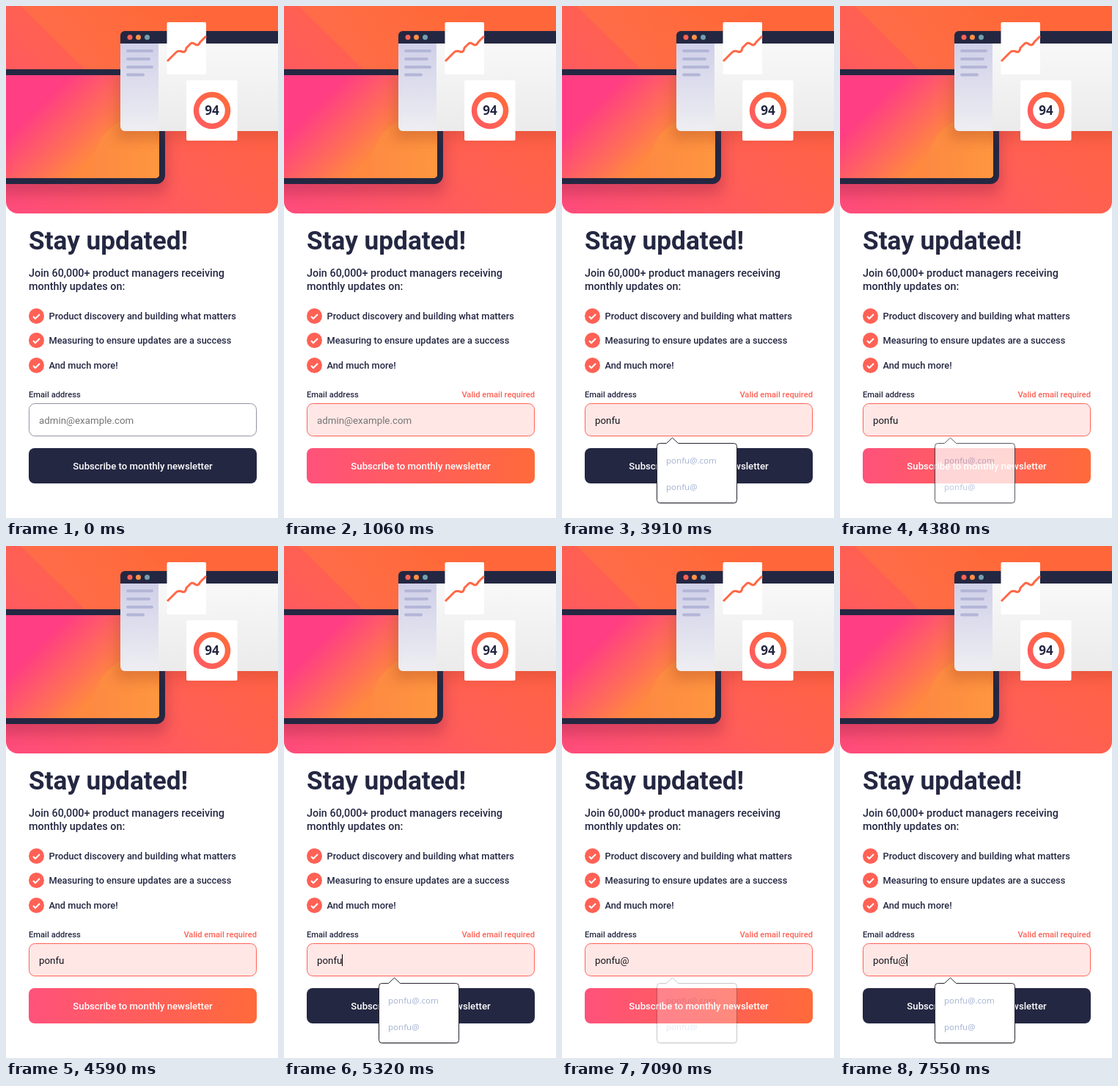
Write an HTML page that moves like this. It is 371 px wide and 696 px high and loops after 8 s.

```html
<!DOCTYPE html>
<html lang="en">
<head>
<meta charset="utf-8">
<title>Newsletter sign-up</title>
<style>
  html, body { margin: 0; width: 100%; height: 100%; overflow: hidden; background: #fff; }
  svg { display: block; font-family: Roboto, sans-serif; font-weight: 500; fill: #242742; }
  .title { font-size: 35.2px; font-weight: 700; }
  .lead { font-size: 14.4px; }
  .list { font-size: 12.8px; }
  .label { font-size: 11.2px; }
  .field { font-size: 13.333px; font-weight: 400; }
  .action { font-size: 13.2px; fill: #fff; text-anchor: middle; }
  .hint { font: 11.55px "Open Sans", sans-serif; fill: #a2b1d2; }
  .red { fill: #ff6155; }
</style>
</head>
<body>
<svg width="371" height="696" viewBox="0 0 371 696">
  <defs>
    <linearGradient id="hero" gradientUnits="userSpaceOnUse" x1="20" y1="290" x2="250" y2="30">
      <stop stop-color="#ff4c7c"/><stop offset=".55" stop-color="#ff5f55"/><stop offset="1" stop-color="#ff6340"/>
    </linearGradient>
    <linearGradient id="facet" gradientUnits="userSpaceOnUse" x1="60" y1="90" x2="190" y2="0">
      <stop stop-color="#ff7048" stop-opacity=".75"/><stop offset="1" stop-color="#ff6a3a"/>
    </linearGradient>
    <linearGradient id="screen" gradientUnits="userSpaceOnUse" x1="50" y1="130" x2="122" y2="202">
      <stop stop-color="#ff3e83"/><stop offset="1" stop-color="#ff893f"/>
    </linearGradient>
    <linearGradient id="sun" x1="0" y1="0" x2="1" y2="0">
      <stop stop-color="#fd8a42"/><stop offset="1" stop-color="#ff9d3d"/>
    </linearGradient>
    <linearGradient id="side" x1="0" y1="0" x2="0" y2="1">
      <stop stop-color="#cfd0e9"/><stop offset="1" stop-color="#eeeeF2"/>
    </linearGradient>
    <linearGradient id="pane" x1="0" y1="0" x2="0" y2="1">
      <stop stop-color="#f8f8f8"/><stop offset="1" stop-color="#ebebeb"/>
    </linearGradient>
    <linearGradient id="warm">
      <stop stop-color="#ff527b"/><stop offset="1" stop-color="#ff6a3a"/>
    </linearGradient>
    <linearGradient id="ring" x1="0" y1="1" x2="1" y2="0">
      <stop stop-color="#ff5a63"/><stop offset="1" stop-color="#ff6c38"/>
    </linearGradient>
    <filter id="soft" x="-20%" y="-20%" width="140%" height="140%"><feGaussianBlur stdDeviation="9"/></filter>
    <clipPath id="card"><rect y="-20" width="371" height="302" rx="16"/></clipPath>
    <clipPath id="display"><rect x="-20" y="94" width="229" height="140" rx="5"/></clipPath>
    <clipPath id="window"><rect x="156" y="34" width="240" height="136" rx="6"/></clipPath>
  </defs>

  <g clip-path="url(#card)">
    <rect width="371" height="282" fill="url(#hero)"/>
    <path d="M20 0 132 110 260 0z" fill="url(#facet)"/>
    <path d="M170 0H371V130z" fill="#ff6a3a" opacity=".7"/>

    <rect x="-30" y="110" width="250" height="146" rx="14" fill="#a02848" opacity=".4" filter="url(#soft)"/>
    <rect x="-20" y="86" width="237" height="156" rx="12"/>
    <g clip-path="url(#display)">
      <rect y="94" width="209" height="140" fill="url(#screen)"/>
      <circle cx="190" cy="220" r="72" fill="url(#sun)"/>
      <rect x="150" y="80" width="230" height="102" fill="#a03c20" opacity=".3" filter="url(#soft)"/>
    </g>

    <rect x="215" y="80" width="180" height="101" fill="#b03428" opacity=".25" filter="url(#soft)"/>
    <g clip-path="url(#window)">
      <rect x="156" y="34" width="215" height="17"/>
      <rect x="156" y="51" width="52" height="119" fill="url(#side)"/>
      <rect x="208" y="51" width="163" height="119" fill="url(#pane)"/>
    </g>
    <circle cx="169" cy="42.5" r="3.5" fill="#ff6155"/>
    <circle cx="180.5" cy="42.5" r="3.5" fill="#ff9148"/>
    <circle cx="192.5" cy="42.5" r="3.5" fill="#739fb0"/>
    <path d="M166 61h33M166 72h29M166 83h33M166 93.5h21" stroke="#b4b6d7" stroke-width="4" stroke-linecap="round"/>

    <rect x="219.500" y="22" width="53.500" height="71" rx="2" fill="#fff"/>
    <path d="M220 75 232 63Q235 60 240 62T246 57L252 51Q254 49 258 52T265 49L273 41" fill="none" stroke="#ff6847" stroke-width="3"/>
    <rect x="246" y="101" width="69.500" height="82" rx="2" fill="#fff"/>
    <circle cx="281" cy="142" r="21.500" fill="none" stroke="url(#ring)" stroke-width="7.500"/>
    <text x="281" y="147.500" text-anchor="middle" style="font:700 17px 'Open Sans',sans-serif">94</text>
  </g>

  <text class="title" x="31" y="331">Stay updated!</text>
  <text class="lead" x="31" y="368">Join 60,000+ product managers receiving</text>
  <text class="lead" x="31" y="386">monthly updates on:</text>
  <g id="list" class="list"></g>

  <text class="label" x="31" y="532">Email address</text>
  <text id="error" class="label red" x="342" y="532" text-anchor="end">Valid email required</text>
  <rect id="box" x="31.500" y="540.500" width="310" height="44" rx="8"/>
  <text id="entry" class="field" x="45" y="568" xml:space="preserve"></text>
  <rect id="caret" x="45" y="555" width="1" height="16" fill="#000"/>

  <rect id="button" x="31" y="601" width="311" height="48" rx="8"/>
  <text class="action" x="186.500" y="630">Subscribe to monthly newsletter</text>

  <g id="popup">
    <rect x="130" y="596" width="109" height="81" rx="4" fill="#000" opacity=".12"/>
    <path d="M133.500 594.500H142.500L150.500 587 158.500 594.500H234.500q4 0 4 4V671.500q0 4-4 4H133.500q-4 0-4-4V598.500q0-4 4-4z" fill="#fff" stroke="#22232f"/>
    <text class="hint" x="142" y="622">ponfu@.com</text>
    <text class="hint" x="142" y="658">ponfu@</text>
  </g>
</svg>
<script>
const PERIOD = 8000;
const ADDRESS = 'ponfu@';
const PLACEHOLDER = 'admin@example.com';
const keyTimes = [2780, 2910, 3180, 3280, 3380, 5920];
const caretOn = [[400, 860], [1920, 2380], [2780, 3910], [5250, 5780], [5920, 6430], [6880, 6950], [7550, PERIOD]];
const buttonHot = [[1060, 1920], [4380, 5250], [6950, 7550]];

const $ = id => document.getElementById(id);
const entry = $('entry'), caret = $('caret'), box = $('box');
const within = (t, spans) => spans.some(([from, to]) => t >= from && t < to);

const items = [
  ['Product discovery and building what matters', 421.5],
  ['Measuring to ensure updates are a success', 454.5],
  ['And much more!', 488.5],
];
$('list').innerHTML = items.map(([text, y]) => `
  <circle class="red" cx="41.5" cy="${y}" r="10.5"/>
  <path d="M37 ${y + .5}l3 3 6-6" fill="none" stroke="#fff" stroke-width="2"/>
  <text x="58.500" y="${y + 4.5}">${text}</text>`).join('');

// The popup closes in four 70 ms steps and reopens at once or in two.
function popupOpacity(t) {
  const closing = start => Math.max(0, .75 - .25 * Math.floor((t - start) / 70));
  if (t < 1920) return 0;
  if (t < 4380) return 1;
  if (t < 5250) return closing(4380);
  if (t < 5320) return .5;
  if (t < 6950) return 1;
  return t < 7550 ? closing(6950) : 1;
}

function draw() {
  const t = performance.now() % PERIOD;
  const invalid = t >= 1060;
  const typed = ADDRESS.slice(0, keyTimes.filter(k => t >= k).length);

  entry.textContent = typed || PLACEHOLDER;
  entry.style.fill = typed ? '#15141a' : '#757575';
  caret.setAttribute('x', 45 + (typed ? Math.floor(entry.getComputedTextLength()) : 0));
  caret.style.opacity = +within(t, caretOn);

  $('error').style.opacity = +invalid;
  box.style.fill = invalid ? '#ffe7e6' : '#fff';
  box.style.stroke = invalid ? '#ff6155' : '#9292a6';
  $('button').style.fill = within(t, buttonHot) ? 'url(#warm)' : '#242742';
  $('popup').style.opacity = popupOpacity(t);
  requestAnimationFrame(draw);
}
draw();
</script>
</body>
</html>
```
